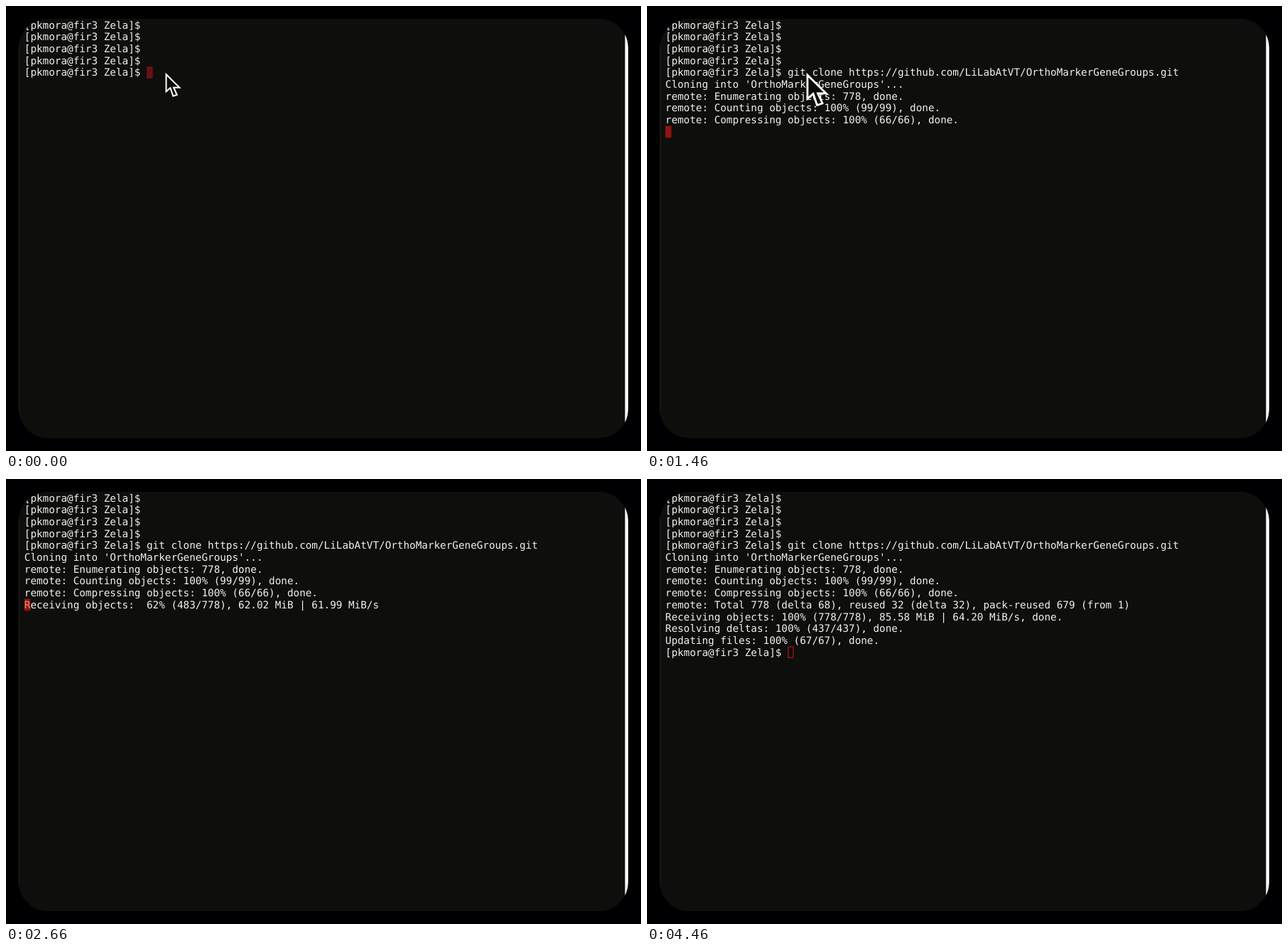
Write an HTML page with a canvas that moves like this. It is 894 by 626 pixels and loops after 4.8 s.

```html
<!DOCTYPE html>
<html lang="en">
<head>
<meta charset="utf-8">
<title>Terminal clone</title>
<style>
  html, body { margin: 0; width: 100%; height: 100%; overflow: hidden; background: #000002; }
  canvas { display: block; }
</style>
</head>
<body>
<canvas id="stage" width="894" height="626"></canvas>
<script>
const ctx = document.getElementById('stage').getContext('2d');
const LOOP = 4800, FRAME = 100 / 3;
const LEFT = 25.8, TOP = 18.4, COL = 8.609, ROW = 16.69;
const PANEL = '#0e0f0c', TEXT = '#f1f1ef', RED = '#8e1512';

const prompt = '[pkmora@fir3 Zela]$ ';
const command = 'git clone https://github.com/LiLabAtVT/OrthoMarkerGeneGroups.git';
const clamp = v => Math.max(0, Math.min(1, v));
const ramp = (t, t0, t1, a, b) => a + (b - a) * clamp((t - t0) / (t1 - t0));

function progress(label, percent, total, suffix = '') {
  const p = Math.floor(percent);
  const count = Math.max(1, Math.ceil(total * p / 100));
  return `${label}: ${String(p).padStart(3)}% (${count}/${total})${suffix}`;
}

function receiving(t) {
  if (t < 1700) return progress('Receiving objects', ramp(t, 1530, 1700, 0, 23), 778);
  if (t < 2230) return progress('Receiving objects', ramp(t, 1700, 1930, 23, 43), 778);
  if (t < 2660) {
    const p = t < 2560 ? 46 : ramp(t, 2560, 2660, 52, 62);
    return progress('Receiving objects', p, 778, ', 30.52 MiB | 61.01 MiB/s');
  }
  if (t < 2860) {
    const p = t < 2800 ? 62 : ramp(t, 2800, 2860, 75, 96);
    return progress('Receiving objects', p, 778, ', 62.02 MiB | 61.99 MiB/s');
  }
  return progress('Receiving objects', 100, 778, ', 85.58 MiB | 64.20 MiB/s, done.');
}

// Lines on screen and the cursor cell at time t.
function terminal(t) {
  const pasted = t >= 260;
  const lines = [prompt, prompt, prompt, prompt, prompt + (pasted ? command : '')];
  if (t < 1000) return { lines, row: 4, col: lines[4].length };
  if (t >= 1030) lines.push("Cloning into 'OrthoMarkerGeneGroups'...");
  if (t >= 1460) lines.push(
    'remote: Enumerating objects: 778, done.',
    'remote: Counting objects: 100% (99/99), done.',
    'remote: Compressing objects: 100% (66/66), done.');
  let row = lines.length;
  if (t >= 2860) lines.push('remote: Total 778 (delta 68), reused 32 (delta 32), pack-reused 679 (from 1)');
  if (t >= 1530) {
    row = lines.length;
    lines.push(receiving(t));
  }
  if (t >= 2900) {
    row = lines.length;
    const p = ramp(t, 2900, 3000, 8, 100);
    lines.push(progress('Resolving deltas', p, 437, p < 100 ? '' : ', done.'));
  }
  if (t >= 3000) row = lines.length;
  if (t >= 4230) lines.push(progress('Updating files', ramp(t, 4230, 4430, 19, 100), 67, t < 4460 ? '' : ', done.'));
  if (t >= 4460) {
    lines.push(prompt);
    return { lines, row: 13, col: prompt.length };
  }
  return { lines, row, col: 0 };
}

const cellX = col => LEFT + col * COL;
const cellY = row => TOP + row * ROW;

function write(text, row, col = 0, color = TEXT) {
  ctx.fillStyle = color;
  ctx.fillText(text, cellX(col), cellY(row) + 13.2);
}

function drawTerminal(t) {
  const { lines, row, col } = terminal(t);
  lines.forEach((line, i) => write(line, i));

  if (t >= 260 && t < 1000) {
    ctx.fillStyle = '#f4f4f2';
    ctx.fillRect(cellX(prompt.length), cellY(4), command.length * COL, ROW);
    write(command, 4, prompt.length, '#10110f');
  }
  if (t >= 3000) {
    ctx.strokeStyle = RED;
    ctx.lineWidth = 1.5;
    ctx.strokeRect(cellX(col) + .8, cellY(row) + .8, COL - 1.6, ROW - 1.6);
    return;
  }
  ctx.fillStyle = t < 100 ? '#6b1015' : RED;
  ctx.fillRect(cellX(col), cellY(row), COL, ROW);
  const covered = (lines[row] || '')[col];
  if (covered) write(covered, row, col, '#f08a78');
}

const arrow = new Path2D('M1.4 3V36.5L9.5 29.5L15 45.5L22.5 43L16 28.8L27.5 28.8Z');

function drawArrow(x, y, scale, angle) {
  ctx.save();
  ctx.translate(x, y);
  ctx.rotate(angle);
  ctx.scale(scale, scale);
  ctx.fillStyle = '#0a0a09';
  ctx.strokeStyle = '#fff';
  ctx.lineWidth = 2.8;
  ctx.fill(arrow);
  ctx.stroke(arrow);
  ctx.restore();
}

const bezier = (a, b, c, s) => a * (1 - s) ** 2 + 2 * b * s * (1 - s) + c * s * s;
const slope = (a, b, c, s) => 2 * ((b - a) * (1 - s) + (c - b) * s);
const pathX = [224.5, 500, 960], pathY = [94, -10, 175];

function drawPointer(t) {
  // Critically damped growth, then an accelerating sweep out to the right.
  const w = t * .012;
  const scale = 1 - .28 * (1 + w) * Math.exp(-w);
  const u = Math.max(0, t - 1466) / 234;
  const s = .76 * u * u;
  if (s > 1.2) return;

  // Straight motion blur along the direction of travel, one frame long.
  const shift = 1.52 * u / 234 * FRAME;
  const dx = slope(...pathX, s) * shift, dy = slope(...pathY, s) * shift;
  const samples = Math.max(1, Math.ceil(Math.hypot(dx, dy) / 3));
  ctx.save();
  if (samples > 1) ctx.globalCompositeOperation = 'lighter';
  ctx.globalAlpha = Math.min(1, 2 / samples);
  for (let i = 0; i < samples; i++) {
    const k = (i + .5) / samples - .5;
    drawArrow(bezier(...pathX, s) + dx * k, bezier(...pathY, s) + dy * k, scale, .4 * clamp(s * 2));
  }
  ctx.restore();
}

function draw(t) {
  ctx.fillStyle = '#000002';
  ctx.fillRect(0, 0, 894, 626);
  ctx.save();
  ctx.beginPath();
  ctx.roundRect(18, 18, 858, 590, 41);
  ctx.clip();
  ctx.fillStyle = PANEL;
  ctx.fillRect(18, 18, 858, 590);
  ctx.fillStyle = '#22231f';
  ctx.fillRect(18, 18, 1, 590);
  ctx.fillStyle = '#fff';
  ctx.fillRect(871.5, 18, 4.5, 590);
  ctx.font = '14.3px "DejaVu Sans Mono", monospace';
  ctx.textRendering = 'geometricPrecision';
  drawTerminal(t);
  drawPointer(t);
  ctx.restore();
}

const start = performance.now();
function tick() {
  const elapsed = (performance.now() - start) % LOOP;
  // 30 steps a second, each starting on a whole 10 ms.
  draw(Math.floor((elapsed + 7) / FRAME) * FRAME % LOOP);
  requestAnimationFrame(tick);
}
tick();
</script>
</body>
</html>
```
